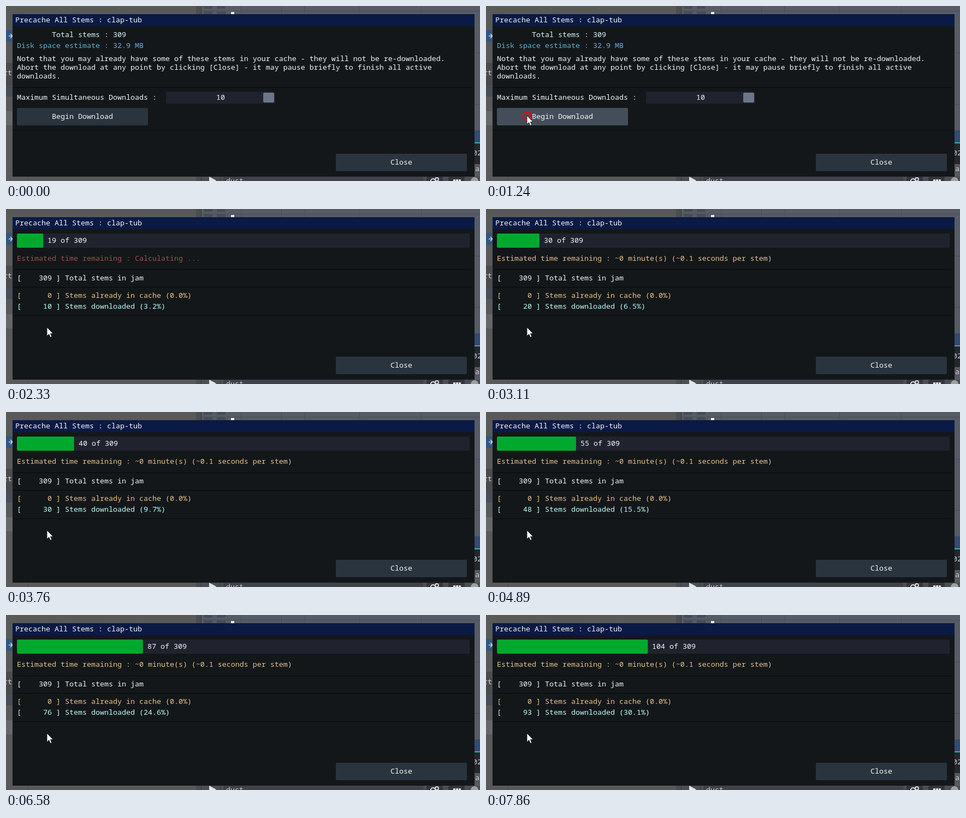
These frames come from a looping animation (868x321 px, 8 s). An HTML page:

```html
<!DOCTYPE html>
<html lang="en">
<head>
<meta charset="utf-8">
<title>Precache dialog</title>
<style>
  html, body { margin: 0; width: 100%; height: 100%; overflow: hidden; background: #58595b; }
  svg { display: block; width: 868px; height: 321px; }
  text { font: 13.333px "Noto Sans Mono", "DejaVu Sans Mono", monospace; fill: #f4f6f6; white-space: pre; }
</style>
</head>
<body>
<svg id="stage" viewBox="0 0 868 321"></svg>
<script>
const LOOP = 8000, TOTAL = 309, START = 1300;
const rect = (x, y, w, h, fill, extra = '') =>
  `<rect x="${x}" y="${y}" width="${w}" height="${h}" fill="${fill}" ${extra}/>`;
const text = (x, y, str, extra = '') => `<text x="${x}" y="${y}" ${extra}>${str}</text>`;
const rule = y => rect(14, y, 840, 1, '#07090a');
const box = (x, y, w, h, fill, id = '') => rect(x, y, w, h, fill, `rx="2" ${id}`);

const backdrop = [
  rect(0, 0, 868, 321, '#59595a'),
  rect(348, 0, 10, 321, '#4c4d51'),
  rect(357, 0, 511, 321, '#575b65'),
  rect(357, 0, 1, 321, '#363940'),
  rect(358, 9, 510, 1, '#4a4e58'),
  ...[430, 504, 546, 647, 760].map(x => rect(x, 0, 1, 15, '#4b4f59')),
  ...[362, 386].flatMap(x => [box(x, -8, 16, 13, '#484c55'), box(x, 9, 16, 10, '#484c55')]),
  rect(412, 11, 6, 5, '#f2f2f2'),
  // left edge
  rect(0, 44, 12, 22, '#34577f'),
  '<path d="M5 55h6M8 51l4 4-4 4" fill="none" stroke="#c9d5e2" stroke-width="1.5"/>',
  rect(0, 104, 12, 42, '#4b4b4d'),
  text(-5, 127, 'rt', 'style="fill:#d4d4d4"'),
  rect(0, 146, 12, 20, '#4a4e5b'),
  rect(0, 193, 12, 26, '#666769'),
  // right edge
  rect(858, 86, 10, 1, '#484c55'),
  rect(858, 180, 10, 1, '#484c55'),
  rect(858, 228, 10, 22, '#344a70'),
  rect(858, 250, 10, 2, '#3fa9b8'),
  rect(858, 252, 10, 38, '#24272d'),
  text(855, 274, '02', 'style="fill:#c8ccd0"'),
  rect(858, 290, 10, 17, '#56585d'),
  text(859, 303, 'ar', 'style="fill:#d0d2d4"'),
  // bottom edge
  rect(40, 313, 1, 8, '#4d4d4f'),
  rect(358, 313, 510, 8, '#4b4e55'),
  rect(392, 313, 1, 8, '#3a3c42'),
  rect(398, 313, 366, 8, '#3f4248'),
  '<path d="M372 313v14l13-7z" fill="#e4e4e4"/>',
  text(403, 325, 'dust', 'style="fill:#c4c6c8"'),
  box(770, 313, 30, 12, '#33363d'),
  '<g fill="none" stroke="#d8dadc" stroke-width="2"><circle cx="782" cy="321" r="4"/><circle cx="789" cy="318" r="3"/></g>',
  box(810, 313, 30, 12, '#33363d'),
  ...[819, 824, 829].map(x => rect(x, 318, 4, 4, '#e0e2e4')),
  '<circle cx="858" cy="321" r="7" fill="#9da29b"/>'
];

const frame = [
  rect(12, 15, 846, 298, '#131719'),
  rect(12, 15, 846, 22, '#0a1a44'),
  text(17, 30, 'Precache All Stems : clap-tub'),
  box(604, 271, 240, 32, '#2a343e'),
  text(704, 291, 'Close')
];

const setup = [
  text(84, 57, 'Total stems : 309', 'style="fill:#dcfaf8"'),
  text(20, 77, 'Disk space estimate : 32.9 MB', 'style="fill:#5db4d2"'),
  text(20, 101, 'Note that you may already have some of these stems in your cache - they will not be re-downloaded.'),
  text(20, 117, 'Abort the download at any point by clicking [Close] - it may pause briefly to finish all active'),
  text(20, 133, 'downloads.'),
  rule(149),
  text(20, 172, 'Maximum Simultaneous Downloads :'),
  box(293, 157, 200, 22, '#20232e'),
  box(471, 159, 20, 18, '#6b768a'),
  text(385, 172, '10'),
  box(20, 187, 240, 32, '#2a343e', 'id="begin"'),
  text(84, 207, 'Begin Download'),
  rule(227)
];

const row = (n, label) => `[${String(n).padStart(7)} ] ${label}`;
const progress = [
  box(20, 45, 829, 26, '#20232e'),
  box(20, 45, 0, 26, '#00a92e', 'id="bar"'),
  text(28, 62, '', 'id="count"'),
  text(20, 95, '', 'id="eta"'),
  rule(111),
  text(20, 131, row(TOTAL, 'Total stems in jam')),
  rule(143),
  text(20, 163, row(0, 'Stems already in cache (0.0%)'), 'style="fill:#e6c18c"'),
  text(20, 183, '', 'id="done" style="fill:#b9fdf8"'),
  rule(195)
];

const $ = id => document.getElementById(id);
$('stage').innerHTML = [
  ...backdrop, ...frame,
  '<g id="setup">', ...setup, '</g><g id="progress">', ...progress, '</g>',
  '<circle id="ring" cx="75.5" cy="202" fill="none" stroke="#dc0d16" stroke-width="3"/>',
  '<path id="cursor" d="M0 0V16L3.7 12.6 6.2 18.3 8.8 17.2 6.3 11.6H11.2Z" fill="#fff" stroke="#111" stroke-width=".8"/>'
].join('');

// time, stems started, stems downloaded
const counts = [
  [1300, 0, 0], [1880, 6, 0], [2330, 19, 10], [2400, 22, 12], [2610, 22, 12], [2820, 27, 17],
  [2970, 27, 17], [3240, 34, 24], [3470, 34, 24], [3760, 40, 30], [4260, 48, 39], [4290, 48, 39],
  [4490, 51, 43], [4640, 51, 43], [4660, 52, 44], [4800, 52, 44], [4890, 55, 48], [5160, 61, 53],
  [5320, 61, 53], [6070, 78, 69], [6250, 78, 69], [6580, 87, 76], [6830, 87, 76], [7330, 95, 85],
  [7480, 95, 85], [7860, 104, 93]
];
// time, x, y of the pointer tip
const path = [
  [160, 476, -18], [780, 75, 201], [1300, 75, 201], [1880, 75, 219],
  [2060, 75, 225], [2300, 75, 217]
];
const smooth = k => k * k * (3 - 2 * k);

function sample(keys, t, ease = k => k) {
  const i = keys.findIndex(key => key[0] > t);
  if (i < 0) return keys.at(-1).slice(1);
  if (i === 0) return keys[0].slice(1);
  const a = keys[i - 1], b = keys[i], k = ease((t - a[0]) / (b[0] - a[0]));
  return a.slice(1).map((v, j) => v + (b[j + 1] - v) * k);
}

const set = (id, attrs) => {
  for (const name in attrs) $(id).setAttribute(name, attrs[name]);
};
const show = (id, on) => set(id, { visibility: on ? 'visible' : 'hidden' });

function draw(t) {
  const [x, y] = sample(path, t, smooth);
  set('cursor', { transform: `translate(${Math.round(x)} ${Math.round(y)})` });
  show('cursor', t >= 160);
  set('begin', { fill: y >= 187 && x < 260 ? '#444e5b' : '#2a343e' });

  show('ring', t >= 1080 && t < 1420);
  const press = (t - 1080) / 160;
  set('ring', {
    r: Math.max(0, press < 1 ? 3 + 4.5 * press : 7.5 + 2 * (press - 1)),
    opacity: Math.min(1, Math.max(0, (1420 - t) / 180))
  });

  show('setup', t < START);
  show('progress', t >= START);
  const [started, done] = sample(counts, t).map(v => Math.floor(v + 1e-6));
  const width = 829 * Math.max(0, started - 1) / TOTAL;
  set('bar', { width });
  set('count', { x: Math.round(28 + width) });
  $('count').textContent = `${started} of ${TOTAL}`;
  const known = t >= 3100;
  $('eta').textContent = 'Estimated time remaining : ' +
    (known ? '~0 minute(s) (~0.1 seconds per stem)' : 'Calculating ...');
  $('eta').style.fill = known ? '#e6c18c' : '#9c514a';
  $('done').textContent = row(done, `Stems downloaded (${(done / TOTAL * 100).toFixed(1)}%)`);
}

const begin = performance.now();
function tick() {
  draw((performance.now() - begin) % LOOP);
  requestAnimationFrame(tick);
}
tick();
</script>
</body>
</html>
```
